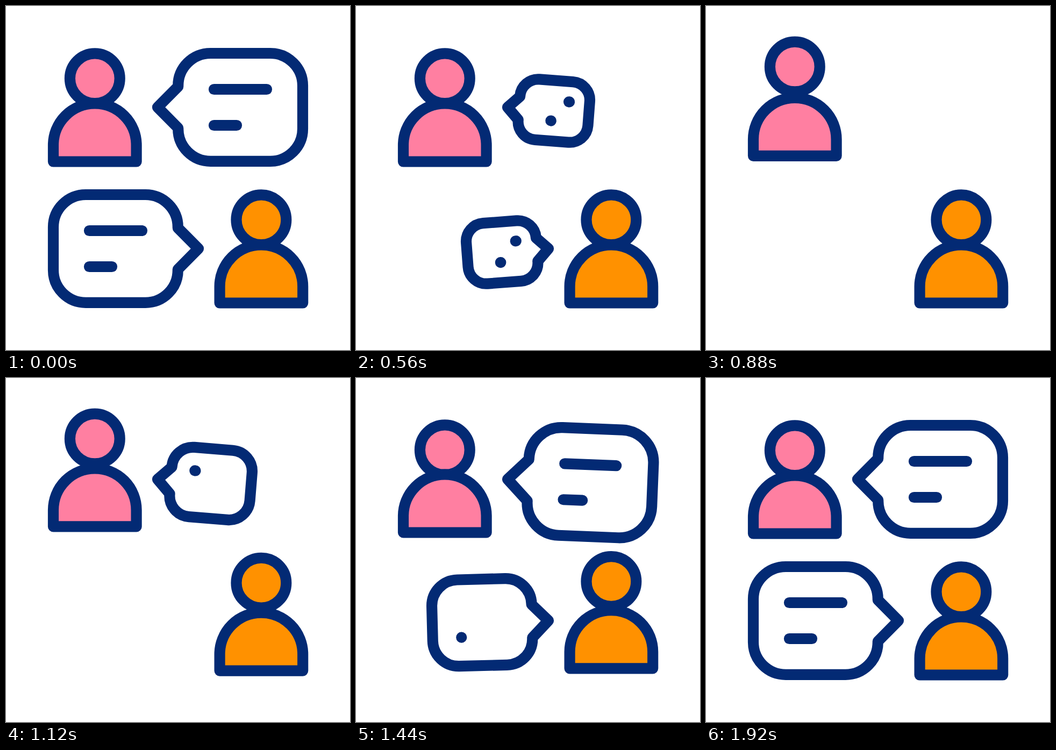
Animation, 640 px wide and 640 px high, one loop 2400 ms. Source, as an HTML page:

```html
<!DOCTYPE html>
<html lang="en">
<head>
<meta charset="utf-8">
<title>Conversation</title>
<style>
  html, body { margin: 0; width: 100%; height: 100%; overflow: hidden; background: #fff; }
  svg { display: block; width: 100%; height: 100%; }
  .ink { stroke: #032a74; stroke-width: 20.2; stroke-linecap: round; stroke-linejoin: round; }
</style>
</head>
<body>
<svg viewBox="0 0 640 640">
  <defs>
    <circle id="head" cx="165.3" cy="134.8" r="46.4"/>
    <path id="torso" d="M88 289.5V258.7A77.3 77.3 0 0 1 242.6 258.7V289.5Z"/>
    <!-- The tip of the tail is the origin -->
    <path id="balloon" d="M98.5 -100.4H209.7A60.3 60.3 0 0 1 270 -40.1V40.1A60.3 60.3 0 0 1 209.7 100.4H98.5A60.3 60.3 0 0 1 38.2 40.1V38.6L0 0L38.2 -38.6V-40.1A60.3 60.3 0 0 1 98.5 -100.4Z"/>
  </defs>
  <g class="ink person" fill="#ff7fa1">
    <use href="#head"/><use href="#torso"/>
  </g>
  <g class="ink person" fill="#ff9100" transform="translate(309.6 263)">
    <use href="#head"/><use href="#torso"/>
  </g>
  <g class="ink bubble" fill="none">
    <use href="#balloon"/><path/><path/>
  </g>
  <g class="ink bubble" fill="none">
    <use href="#balloon" transform="scale(-1 1)"/><path/><path/>
  </g>
</svg>
<script>
const LOOP = 2400, STEP = 40, LAG = 280, STROKE = 20.2;

const easeIn = power => u => u ** power;
const easeOut = u => 1 - (1 - u) ** 2;
const easeInOut = u => u < .5 ? 2 * u * u : 1 - 2 * (1 - u) ** 2;

const progress = (t, from, to, ease = easeInOut) =>
  ease(Math.min(1, Math.max(0, (t - from) / (to - from))));

// Each key is [time, value]; the motion between keys eases in and out.
function track(t, keys) {
  let value = keys[0][1];
  for (let i = 1; i < keys.length; i++) {
    const [t0, v0] = keys[i - 1], [t1, v1] = keys[i];
    if (t >= t0) value = v0 + (v1 - v0) * progress(t, t0, t1);
  }
  return value;
}

const TILT = [[900, 15], [1320, -4], [1460, 2.6], [1620, 0]];
const people = [...document.querySelectorAll('.person')].map((node, i) => ({
  parts: node.children, lag: i * LAG
}));
const bubbles = [...document.querySelectorAll('.bubble')].map((node, i) => ({
  node,
  lines: [...node.querySelectorAll('path')],
  lag: i * LAG,
  side: i ? -1 : 1,
  tip: i ? [358, 451.4] : [282, 188.4],
  rows: i
    ? [{ x: -203, y: -33.4, length: 98, start: 1200 }, { x: -203, y: 33.6, length: 42, start: 1150 }]
    : [{ x: 105, y: -33.4, length: 98, start: 1080 }, { x: 105, y: 33.6, length: 42, start: 1150 }]
}));

function hop(t, height, peak, end) {
  return t < peak
    ? height * progress(t, 760, peak, easeOut)
    : height * (1 - progress(t, peak, end));
}

function drawPerson({ parts, lag }, time) {
  const t = time - lag;
  const lifts = [hop(t, 26, 960, 1520), hop(t, 14.2, 1000, 1600)];
  lifts.forEach((lift, i) => parts[i].setAttribute('transform', `translate(0 ${-lift})`));
}

function drawBubble({ node, lines, lag, side, tip, rows }, time) {
  const leaving = time < 760, t = time - lag;
  const scale = leaving
    ? 1 - progress(time, 160, 720, easeIn(2.45))
    : progress(t, 900, 1280);
  const tilt = side * (leaving ? 10 * (1 - scale) : track(t, TILT));
  const visible = scale > 0;
  node.style.display = visible ? '' : 'none';
  if (!visible) return;

  node.setAttribute('transform', `translate(${tip}) rotate(${tilt}) scale(${scale})`);
  node.style.strokeWidth = STROKE / scale;
  rows.forEach(({ x, y, length, start }, i) => {
    const from = leaving ? progress(time, 160, 564, easeIn(2)) : 0;
    const to = leaving ? 1 : progress(t, start, start + 400);
    const d = to > from ? `M${x + length * from} ${y}L${x + length * to} ${y}` : '';
    lines[i].setAttribute('d', d);
  });
}

function draw(time) {
  people.forEach(person => drawPerson(person, time));
  bubbles.forEach(bubble => drawBubble(bubble, time));
}

let origin;
function tick(now) {
  origin ??= now;
  draw(Math.floor((now - origin) % LOOP / STEP) * STEP);
  requestAnimationFrame(tick);
}
draw(0);
requestAnimationFrame(tick);
</script>
</body>
</html>
```
